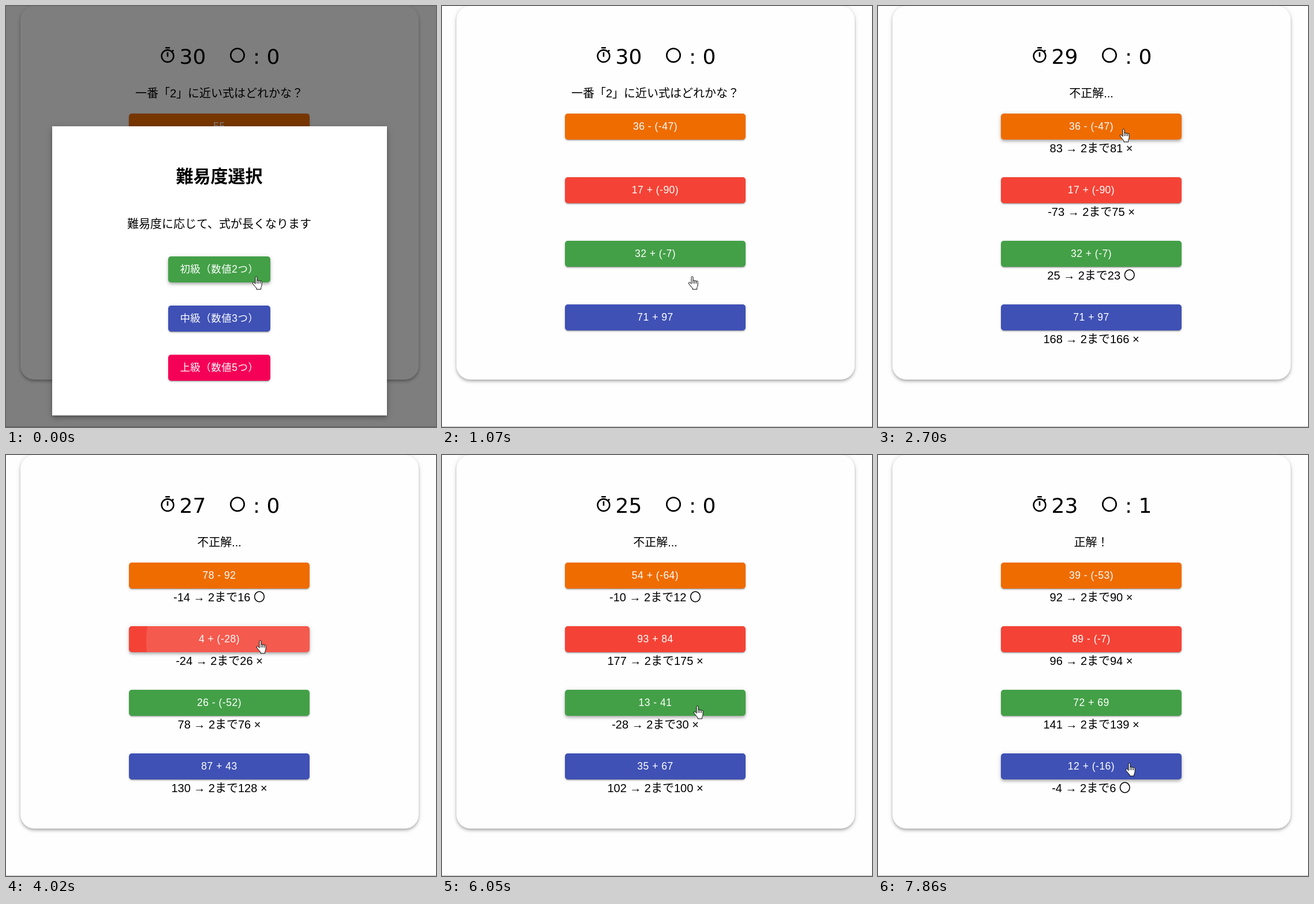
These frames come from a looping animation (745x728 px, 8230 ms). An HTML page:

```html
<!DOCTYPE html>
<html lang="ja">
<head>
<meta charset="utf-8">
<style>
html, body { margin: 0; width: 100%; height: 100%; overflow: hidden; background: #fefefe; }
body { position: relative; color: #000; font: 300 20px "Liberation Sans", "Noto Sans CJK JP", "Noto Sans CJK", sans-serif; }
div, svg { position: absolute; white-space: pre; }
.line { left: 0; width: 739px; height: 40px; line-height: 40px; text-align: center; }
.big { font: 36px/40px "DejaVu Sans", sans-serif; top: 67.5px; }
.card { left: 25px; top: 0; width: 690px; height: 646px; border-radius: 24px; background: #fefefe; }
.btn { left: 213px; width: 313px; height: 45px; border-radius: 5px; overflow: hidden; color: #fff;
  font-size: 17.5px; font-weight: 500; line-height: 45px; letter-spacing: .5px; text-align: center;
  box-shadow: 0 3px 1px -2px rgba(0,0,0,.2), 0 2px 2px rgba(0,0,0,.14), 0 1px 5px rgba(0,0,0,.12); }
.card, .hover { box-shadow: 0 2px 4px -1px rgba(0,0,0,.2), 0 4px 5px rgba(0,0,0,.14), 0 1px 10px rgba(0,0,0,.12); }
.label { inset: 0; }
.ripple { border-radius: 50%; background: #fff; }
.foot { left: 0; top: 727px; width: 100%; height: 1px; background: #bbb; }
#shade { inset: 0; background: rgba(0,0,0,.5); }
#dialog { inset: 0; }
.paper { left: 80px; top: 208px; width: 580px; height: 500px; background: #fff;
  box-shadow: 0 3px 5px -1px rgba(0,0,0,.2), 0 5px 8px rgba(0,0,0,.14), 0 1px 14px rgba(0,0,0,.12); }
#dialog .btn { left: 281px; width: 177px; }
#glow { width: 30px; height: 30px; border-radius: 50%; background: rgba(255,255,0,.5); }
</style>
</head>
<body>
<div class="card"></div>
<div class="foot"></div>
<svg width="745" height="180">
  <path transform="translate(264.4 69.6) scale(1.3)" d="M15 1H9v2h6zM11 14h2V8h-2zM19.03 7.39l1.42-1.42c-.43-.51-.9-.99-1.41-1.41l-1.42 1.42C16.07 4.74 14.12 4 12 4c-4.97 0-9 4.03-9 9s4.02 9 9 9 9-4.03 9-9c0-2.12-.74-4.07-1.97-5.61zM12 20c-3.87 0-7-3.13-7-7s3.13-7 7-7 7 3.13 7 7-3.13 7-7 7z"/>
  <circle cx="401" cy="85.2" r="11.7" fill="none" stroke="#000" stroke-width="2.6"/>
</svg>
<div class="big" id="timer" style="left:300.5px"></div>
<div class="big" id="score" style="left:428px"></div>
<div class="line" id="prompt" style="top:131px"></div>
<div id="shade"></div>
<div id="dialog">
  <div class="paper"></div>
  <div class="line" style="top:274.5px; font-size:30px; font-weight:700">難易度選択</div>
  <div class="line" style="top:357px">難易度に応じて、式が長くなります</div>
  <div class="btn hover" style="top:433px; background:#43a047">初級（数値2つ）</div>
  <div class="btn" style="top:518px; background:#3f51b5">中級（数値3つ）</div>
  <div class="btn" style="top:603px; background:#f50057">上級（数値5つ）</div>
</div>
<svg id="hand" width="20" height="26" fill="#fff" stroke="#000" stroke-linejoin="round">
  <path d="M6 13.5V2.3a1.5 1.5 0 0 1 3 0V8.5a1.4 1.4 0 0 1 2.8.4a1.4 1.4 0 0 1 2.8.6a1.3 1.3 0 0 1 2.6.8V15c0 3-1.5 4-1.5 5.5v2.5H8V21C6 18.5 3 15.5 1.5 13c-1-1.8 1-3 2.3-1.8z"/>
  <path d="M9 8.5v4.5M11.8 9v4M14.6 9.6v3.4"/>
</svg>
<div id="glow"></div>
<script>
const LOOP = 8230, TARGET = 2;
const COLORS = ['#ef6c00', '#f44336', '#43a047', '#3f51b5'];
// In each round the player presses the button with the round's own index.
const ROUNDS = [
  { start: 900, press: 2004, sums: [[36, '-', -47], [17, '+', -90], [32, '+', -7], [71, '+', 97]] },
  { start: 3150, press: 3704, sums: [[78, '-', 92], [4, '+', -28], [26, '-', -52], [87, '+', 43]] },
  { start: 4870, press: 5264, sums: [[54, '+', -64], [93, '+', 84], [13, '-', 41], [35, '+', 67]] },
  { start: 6370, press: 7204, sums: [[39, '-', -53], [89, '-', -7], [72, '+', 69], [12, '+', -16]] }
];
const GLOW_DELAY = 86, RELEASE = 111, ANSWER = 146, RIPPLE = 550;
// Pointer moves: start, end, x, y
const MOVES = [[0, 1, 426, 467], [1320, 1900, 417, 209], [2200, 2300, 418, 212],
  [2880, 3690, 433, 320], [4830, 5250, 435, 433], [6310, 7040, 428, 532]];

const $ = id => document.getElementById(id);
const clamp = v => Math.max(0, Math.min(1, v));

// cubic-bezier(.4, 0, .2, 1)
function ease(x) {
  x = clamp(x);
  let lo = 0, hi = 1;
  for (let i = 0; i < 20; i++) {
    const s = (lo + hi) / 2, r = 1 - s;
    if (1.2 * r * r * s + .6 * r * s * s + s * s * s < x) lo = s; else hi = s;
  }
  return lo * lo * (3 - 2 * lo);
}

function add(parent, cls, before) {
  const el = document.createElement('div');
  el.className = cls;
  parent.insertBefore(el, before || null);
  return el;
}

const buttons = COLORS.map((color, i) => {
  const top = 186 + 110 * i;
  const box = add(document.body, 'btn', $('shade'));
  box.style.cssText = `top:${top}px;background:${color}`;
  const result = add(document.body, 'line', $('shade'));
  result.style.top = top + 40 + 'px';
  return { top, box, result, label: add(box, 'label'), ripple: add(box, 'ripple') };
});

function setText(el, text) {
  if (el.textContent !== text) el.textContent = text;
}

const formula = ([a, op, b]) => `${a} ${op} ${b < 0 ? `(${b})` : b}`;
const value = ([a, op, b]) => op === '+' ? a + b : a - b;

function pointerAt(t) {
  let [, , x, y] = MOVES[0];
  for (const [from, to, nx, ny] of MOVES) {
    const k = ease((t - from) / (to - from));
    x += (nx - x) * k;
    y += (ny - y) * k;
  }
  return [x, y];
}

function drawRipple(el, age, x, y) {
  const visible = age > 0 && age < RELEASE + RIPPLE;
  el.style.display = visible ? '' : 'none';
  if (!visible) return;
  const grow = ease(age / RIPPLE);
  const r = grow * Math.hypot(Math.max(313 - x, x) + 1, Math.max(45 - y, y) + 1);
  el.style.left = x - r + 'px';
  el.style.top = y - r + 'px';
  el.style.width = el.style.height = 2 * r + 'px';
  el.style.opacity = (.1 + .2 * grow) * (1 - ease((age - RELEASE) / RIPPLE));
}

function draw(t) {
  const n = ROUNDS.filter(r => t >= r.start).length - 1;
  const round = ROUNDS[n];
  const age = round ? t - round.press : -1;
  const answered = age >= ANSWER;
  const gaps = round ? round.sums.map(s => Math.abs(value(s) - TARGET)) : [];
  const best = gaps.indexOf(Math.min(...gaps));
  const [x, y] = pointerAt(t);
  const tipX = x + 6.5, tipY = y + 1;

  setText($('timer'), String(30 - Math.max(0, Math.floor((t - 858) / 1000))));
  setText($('score'), ': ' + (answered && best === n ? 1 : 0));
  setText($('prompt'), !answered ? `一番「${TARGET}」に近い式はどれかな？` : best === n ? '正解！' : '不正解...');

  buttons.forEach((b, i) => {
    const sum = round && round.sums[i];
    setText(b.label, sum ? formula(sum) : i ? '' : '55');
    setText(b.result, answered ? `${value(sum)} → ${TARGET}まで${gaps[i]} ${i === best ? '〇' : '×'}` : '');
    const over = n >= 0 && tipX > 213 && tipX < 526 && tipY > b.top && tipY < b.top + 45;
    b.box.classList.toggle('hover', over);
    drawRipple(b.ripple, i === n ? age : -1, tipX - 213, tipY - b.top);
  });

  const fade = t < 900 ? 1 : 1 - ease((t - 867) / 195);
  $('shade').style.display = t < 900 ? '' : 'none';
  $('dialog').style.opacity = fade;
  $('dialog').style.display = fade > .001 ? '' : 'none';

  $('hand').style.left = x + 'px';
  $('hand').style.top = y + 'px';
  $('glow').style.left = tipX - 15.5 + 'px';
  $('glow').style.top = tipY - 16 + 'px';
  $('glow').style.display = age >= GLOW_DELAY && !answered ? '' : 'none';
}

const begin = performance.now();
function tick() {
  draw((performance.now() - begin) % LOOP);
  requestAnimationFrame(tick);
}
tick();
</script>
</body>
</html>
```
